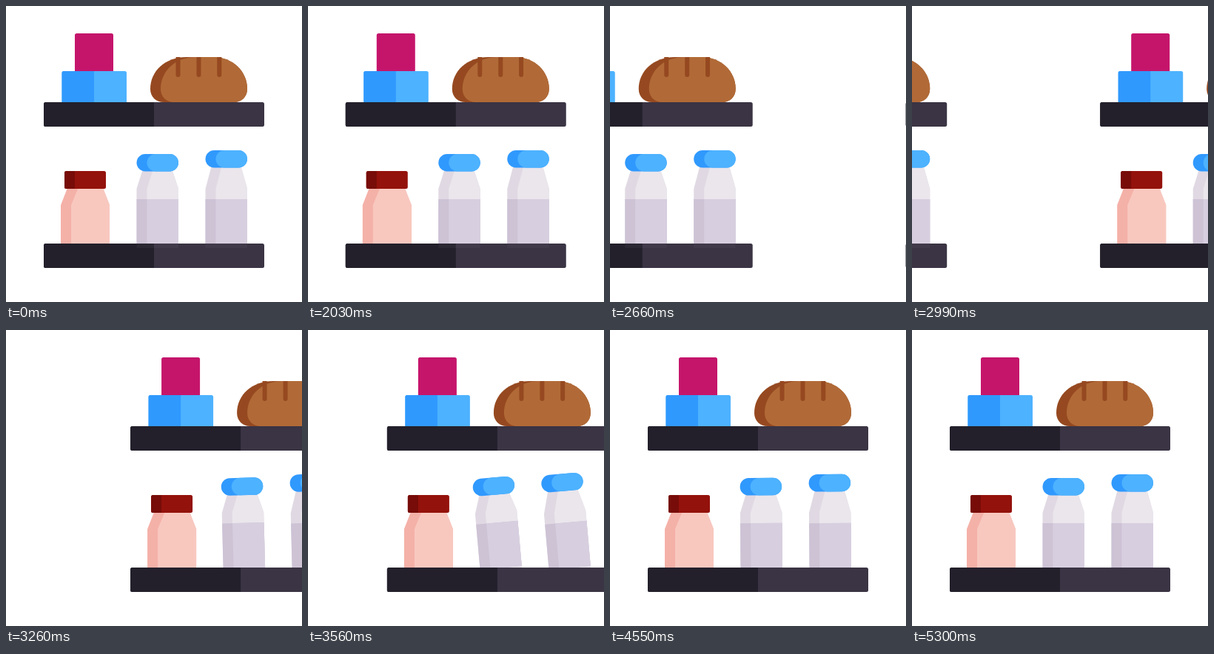
Recreate the animation shown at these times as an HTML page. Size 400 px wide and 400 px high, loop 5330 ms.

```html
<!DOCTYPE html>
<html lang="en">
<head>
<meta charset="utf-8">
<title>Grocery shelves</title>
<style>
  html, body { margin: 0; width: 100%; height: 100%; overflow: hidden; background: #fff; }
  svg { display: block; width: 100vw; height: 100vh; }
</style>
</head>
<body>
<svg id="stage" viewBox="0 0 400 400"></svg>
<script>
const LOOP = 5330, HOLD = 2030, STEP = 30;
const MOVE_START = 2000, MOVE_TIME = 2400, TRAVEL = 505;
const TILT_START = 3000, TILT_PEAK = 3950, TILT_END = 4650, TILT = 8;

const rect = (x, y, w, h, fill, r = 0) =>
  `<rect x="${x}" y="${y}" width="${w}" height="${h}" rx="${r}" fill="${fill}"/>`;
const path = (d, fill) => `<path d="${d}" fill="${fill}"/>`;

// Rounded block whose left part, up to x = split, is darker
const block = (x, y, w, h, split, dark, light, r = 2.5) =>
  rect(x, y, w, h, light, r) +
  path(`M${split} ${y}H${x + r}q${-r} 0 ${-r} ${r}V${y + h - r}q0 ${r} ${r} ${r}H${split}z`, dark);

const shelf = y => block(51, y, 298, 33, 200, '#23202b', '#3a3444');

const boxes =
  rect(93, 37, 52, 53, '#c5156b', 2.5) +
  block(75.5, 88, 87.5, 44, 119, '#3099fe', '#4db2ff');

const loaf = (x, top) =>
  `M${x} 112C${x} 88 ${x + 20} 69 ${top} 69H280C306 69 326 88 326 112` +
  `C326 123 318 130 308 130H${x + 18}C${x + 8} 130 ${x} 123 ${x} 112z`;
const slit = x => path(`M${x - 3} 69h6v24a3 3 0 0 1-6 0z`, '#964920');
const bread = path(loaf(195, 244), '#964920') + path(loaf(209, 256), '#b16a37') +
  [232.5, 260.5, 288.3].map(slit).join('');

const jar =
  path('M83 246L74 269V323H140V269L131 246z', '#f4b1a8') +
  path('M97.5 246L88 269V323H140V269L131 246z', '#f8c8bf') +
  block(79, 223, 56, 24, 93, '#770c08', '#94120c');

const bottle = (x, top) => {
  const neck = top + 20;
  const body = left => `M${left + 8.5} ${neck}L${left} 247V327H${x + 56.5}V247L${x + 47.5} ${neck}z`;
  return path(body(x), '#e0d9e3') + path(body(x + 14), '#eae6ec') +
    rect(x, 261, 56.5, 61.5, '#cdc3d5') + rect(x + 14, 261, 42.5, 61.5, '#d7cfdf') +
    rect(x, top, 56.5, 23.5, '#3099fe', 11.75) +
    rect(x + 14, top, 42.5, 23.5, '#4db2ff', 11.75);
};
const bottles = [[176.5, 200], [269.5, 195]];

const scene = (id, tail) => `<g id="${id}">` + boxes + bread + shelf(130) + jar +
  bottles.map(([x, top]) => `<g class="bottle" data-x="${x + 16}">${bottle(x, top)}</g>`).join('') +
  shelf(321) + tail + '</g>';

// Faint glass bottoms in front of the lower shelf
const tail = '<g opacity=".04">' +
  bottles.map(([x]) => rect(x, 321, 56.5, 6, '#e0c8f0')).join('') + '</g>';

const stage = document.getElementById('stage');
stage.innerHTML = rect(0, 0, 400, 400, '#fff') + scene('leaving', tail) + scene('coming', '');
const leaving = document.getElementById('leaving');
const coming = document.getElementById('coming');
const tilted = [...coming.querySelectorAll('.bottle')];

const clamp = v => Math.min(1, Math.max(0, v));
const smooth = v => v * v * (3 - 2 * v);

// Cubic curve with handles (x1, 0) and (x2, 1)
function ease(u, x1, x2) {
  let lo = 0, hi = 1;
  for (let i = 0; i < 30; i++) {
    const s = (lo + hi) / 2, r = 1 - s;
    if (3 * s * r * r * x1 + 3 * s * s * r * x2 + s * s * s < u) lo = s; else hi = s;
  }
  return u >= 1 ? 1 : smooth(lo);
}

function angle(t) {
  const rise = smooth(clamp((t - TILT_START) / (TILT_PEAK - TILT_START)));
  const fall = smooth(clamp((t - TILT_PEAK) / (TILT_END - TILT_PEAK)));
  return -TILT * (rise - fall);
}

function draw(ms) {
  let t = ms % LOOP;
  t = t < HOLD ? 0 : HOLD + Math.floor((t - HOLD) / STEP) * STEP;
  const u = clamp((t - MOVE_START) / MOVE_TIME);
  const d = u > 0 ? TRAVEL * ease(u, 0.333, 0.3) : 0;
  leaving.setAttribute('transform', `translate(${-d} 0)`);
  coming.setAttribute('transform', `translate(${TRAVEL - d} 0)`);
  const a = angle(t);
  for (const b of tilted) b.setAttribute('transform', `rotate(${a} ${b.dataset.x} 321)`);
}

const start = performance.now();
function tick() {
  draw(performance.now() - start);
  requestAnimationFrame(tick);
}
tick();
</script>
</body>
</html>
```
